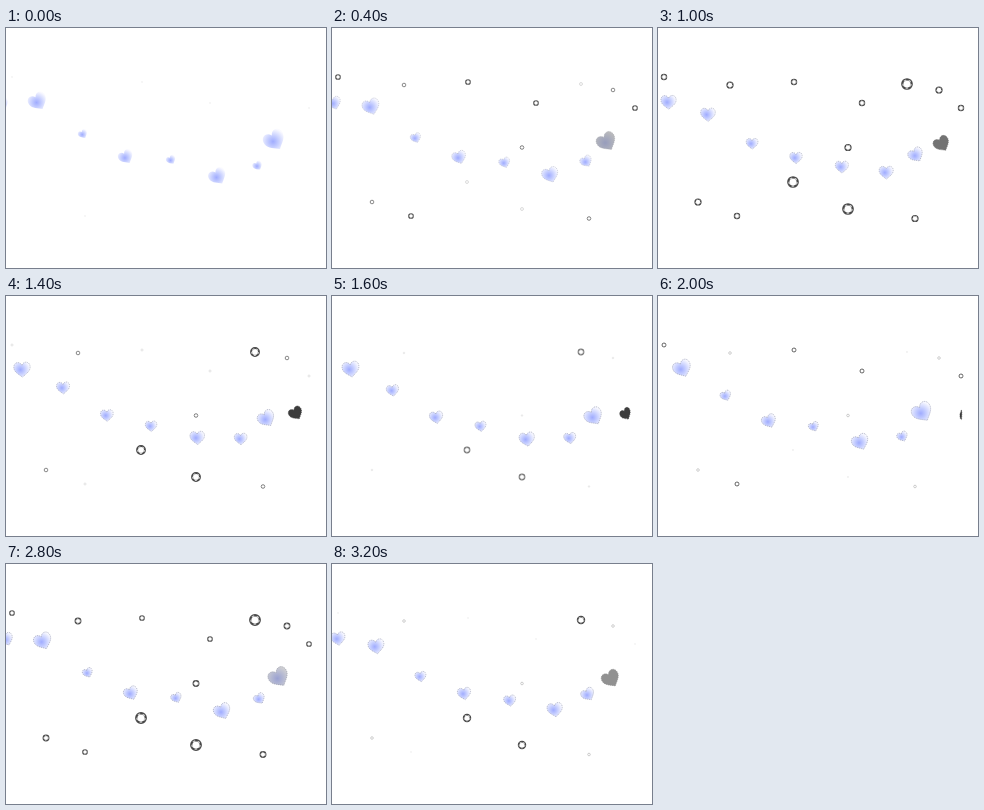
Write an HTML page with a canvas that moves like this. It is 320 by 240 pixels and loops after 3.4 s.

```html
<!DOCTYPE html>
<html>
<head>
<meta charset="utf-8">
<style>
html, body { margin: 0; width: 100%; height: 100%; overflow: hidden; background: #fff; }
canvas { display: block; width: 320px; height: 240px; }
</style>
</head>
<body>
<canvas id="c" width="320" height="240"></canvas>
<script>
const ctx = document.getElementById('c').getContext('2d');
const LOOP = 3400, STEP = 200, PULSE = LOOP / 2;

// Stops along the trail: x, y, heart width
const trail = [
  [-5, 76, 12], [30, 72, 19], [75, 105, 9], [118, 129, 15], [163, 131, 9],
  [210, 149, 18], [251, 139, 9], [267, 112, 22], [305, 121, 8]
];

// Rings that pulse together: delay in ms, largest radius, centres
const groups = [
  { delay: -100, size: 3.7, at: [[6, 49], [136, 54], [204, 75], [303, 80], [79, 188]] },
  { delay: 50, size: 3.8, at: [[72, 57], [281, 62], [190, 119.5], [40, 174], [257, 190.5]] },
  { delay: 230, size: 6.1, at: [[249, 56], [135, 154], [190, 181]] }
];

const heart = new Path2D('M0-.27C.14-.56 .54-.48 .5-.1C.47.16 .18.3 0 .47C-.18.3 -.47.16 -.5-.1C-.54-.48 -.14-.56 0-.27Z');
const lerp = (a, b, k) => a + (b - a) * k;
const mix = (a, b, k) => a.map((v, i) => lerp(v, b[i], k));
const ramp = (v, a, b) => Math.min(1, Math.max(0, (v - a) / (b - a)));
const rgb = c => `rgb(${c.map(Math.round)})`;

function drawHeart(u, t) {
  const i = Math.floor(u), k = u - i;
  const last = i === 7;
  if (i < 0 || i > 7 || last && k > .9) return;
  const [x, y, w] = mix(trail[i], trail[i + 1], k);
  const lean = i > 5 ? 1 : Math.cos(Math.PI * u) ** 2;
  const gray = last ? ramp(k, .06, .3) : 0;
  const shade = lerp(145, 60, ramp(k, .36, .6));
  const tint = c => rgb(mix(c, [shade, shade, shade], gray));

  ctx.save();
  ctx.translate(x, y);
  if (last) {
    // The leading heart narrows towards its right edge
    ctx.translate(w / 2, 0);
    ctx.scale(lerp(1, .2, ramp(k, .65, .84)), 1);
    ctx.translate(-w / 2, 0);
  }
  ctx.rotate(-.55 * lean);
  ctx.scale(w, w);
  const g = ctx.createRadialGradient(-.1, 0, 0, -.1, 0, .6);
  g.addColorStop(0, tint([160, 172, 255]));
  g.addColorStop(.4, tint([194, 203, 255]));
  g.addColorStop(1, tint([250, 250, 255]));
  ctx.fillStyle = g;
  ctx.fill(heart);
  ctx.globalAlpha = ramp(t, 0, 600);
  ctx.lineWidth = .6 / w;
  ctx.setLineDash([1.2 / w, .8 / w]);
  ctx.strokeStyle = tint([155, 160, 185]);
  ctx.stroke(heart);
  ctx.restore();
}

function drawRing(x, y, r, alpha) {
  const circle = (radius, width, color, dash) => {
    ctx.beginPath();
    ctx.arc(x, y, radius, 0, Math.PI * 2);
    ctx.lineWidth = width;
    ctx.strokeStyle = color;
    ctx.setLineDash(dash);
    ctx.stroke();
  };
  ctx.globalAlpha = alpha;
  circle(r * .78, r * .38, '#484848', []);
  circle(r * .65, r * .25, '#ccc', [r * .4, r * .417]);
  ctx.globalAlpha = 1;
}

function draw(t) {
  ctx.clearRect(0, 0, 320, 240);
  for (const { delay, size, at } of groups) {
    const s = t < delay ? 0 : Math.abs(Math.sin(Math.PI * (t - delay) / PULSE));
    for (const [x, y] of at) drawRing(x, y, size * s, lerp(.25, 1, ramp(s, .4, .67)));
  }
  const phase = (t + 120) / 2520;
  for (let i = -1; i < 8; i++) drawHeart(i + phase, t);
}

function tick() {
  const t = performance.now() % LOOP;
  draw(Math.floor(t / STEP) * STEP);
  requestAnimationFrame(tick);
}
tick();
</script>
</body>
</html>
```
